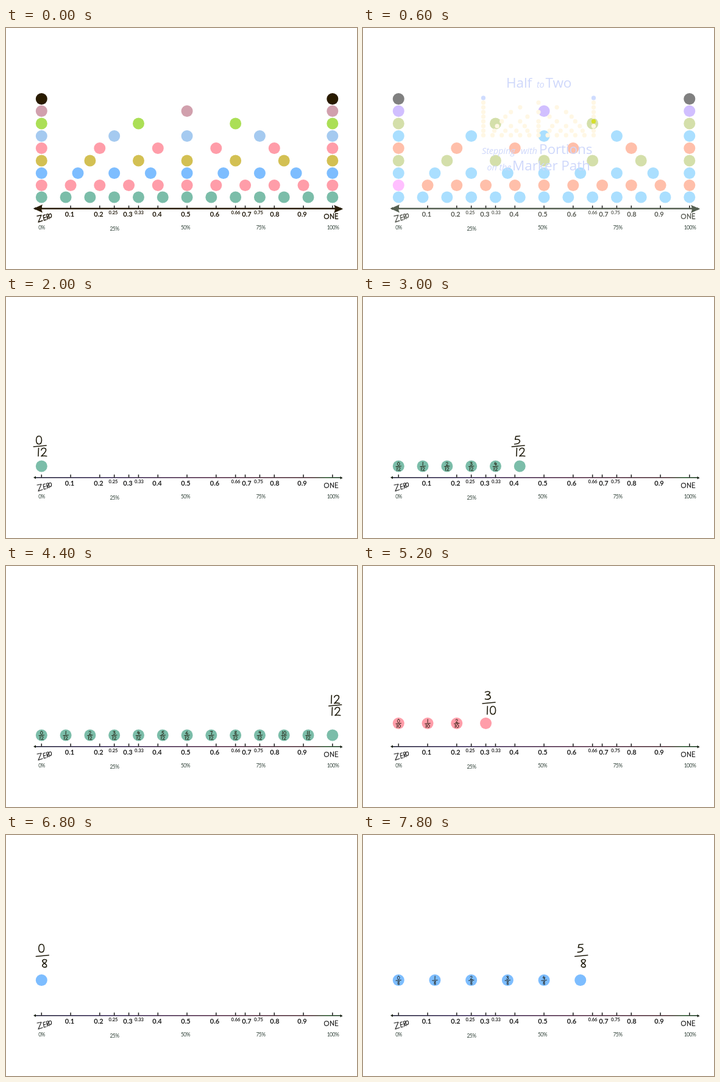
These frames come from a looping animation (576 px wide and 396 px high, 8 s). An HTML page:

```html
<!DOCTYPE html>
<html lang="en">
<head>
<meta charset="utf-8">
<title>Fractions on a line</title>
<style>
  html, body { margin: 0; width: 100%; height: 100%; overflow: hidden; background: #fff; }
  svg { display: block; width: 576px; height: 396px; }
  text { font-family: "Open Sans", "Noto Sans", sans-serif; }
  .title { font-size: 22.5px; letter-spacing: -.1px; }
  .title .it { font-size: 14.5px; font-style: italic; letter-spacing: -.1px; }
  #labels text { text-anchor: middle; font-family: Lato, "Open Sans", sans-serif; }
  #labels .big { font-size: 11px; font-weight: 700; }
  #labels .small { font-size: 7.6px; font-weight: 700; }
  #labels .pct { font-size: 8.5px; letter-spacing: -.5px; fill: #33443b; }
  .pen { fill: none; stroke-linecap: round; stroke-linejoin: round; }
  .hide { display: none; }
</style>
</head>
<body>
<svg id="stage" viewBox="0 0 576 396" xmlns="http://www.w3.org/2000/svg">
  <defs>
    <linearGradient id="ink" gradientUnits="userSpaceOnUse" x1="45" y1="0" x2="552" y2="0">
      <stop offset="0" stop-color="#17172f"/>
      <stop offset=".25" stop-color="#2c1c4c"/>
      <stop offset=".6" stop-color="#4a1f3c"/>
      <stop offset=".9" stop-color="#43222a"/>
      <stop offset=".95" stop-color="#1d4a20"/>
      <stop offset="1" stop-color="#14301a"/>
    </linearGradient>
  </defs>
  <g id="axis">
    <path d="M47 296.7H551" stroke="url(#ink)" stroke-width="1.4"/>
    <path d="M45 296.7L49 294.3V299.1ZM552.5 297.2L548.5 294.8V299.6Z" fill="#1c2418"/>
    <path id="ticks" stroke="#222" stroke-width="1.5"/>
  </g>
  <g id="thick">
    <path d="M54 296.8H544" stroke="currentColor" stroke-width="2.5"/>
    <path d="M45 296.8L60 290Q56.5 297 60 303.6ZM553 297.3L538 290.8Q541.500 297 538 304Z" fill="currentColor"/>
  </g>
  <g id="labels"></g>
  <g id="words" class="pen" stroke="currentColor" stroke-width="1.15">
    <path aria-label="ZERO" d="M51 309L58 307.500L53 319L60 316.500M61 308L62.500 316L66 315M61 308L64.500 307M61.800 312L65 311M66.500 306.500L68 314.500M66.500 306.500Q70 304.500 70 308Q69 310 67 310.500L71 313.500M72.300 305.300C69 306 70 312 72.600 311.800S75.500 305 72.300 305.300"/>
    <path aria-label="ONE" d="M526 305.800C521 306 521.500 313.500 526 313.400S531 305.800 526 305.800M532.500 313.500V305.500L537.500 313V305M540.500 305V313.500H544.800M540.500 305H544.500M540.500 309H544"/>
  </g>
  <g id="full"></g>
  <g id="intro">
    <g id="mini" transform="translate(175.4 70.8) scale(.379)"></g>
    <g class="title">
      <text y="98"><tspan x="235">Half</tspan> <tspan class="it" x="285">to</tspan> <tspan x="299.500">Two</tspan></text>
      <text y="207"><tspan class="it" x="195">Stepping</tspan> <tspan class="it" x="259">with</tspan> <tspan x="289">Portions</tspan></text>
      <text y="234"><tspan class="it" x="203.500">on the</tspan> <tspan x="245">Marker Path</tspan></text>
    </g>
  </g>
  <g id="count"></g>
</svg>
<script>
const $ = id => document.getElementById(id);
const xAt = v => 58.3 + 477.5 * v;

function add(parent, name, attrs, text) {
  const el = document.createElementNS('http://www.w3.org/2000/svg', name);
  for (const key in attrs) el.setAttribute(key, attrs[key]);
  if (text) el.textContent = text;
  return parent.appendChild(el);
}

// Colour helpers: start -> washed -> end over fade steps 0..6
const rgb = hex => [1, 3, 5].map(i => parseInt(hex.slice(i, i + 2), 16));
const mix = (a, b, p) => {
  const to = rgb(b);
  return `rgb(${rgb(a).map((c, i) => Math.round(c + (to[i] - c) * p))})`;
};
const fade = (a, b, c, k) => k <= 2 ? mix(a, b, k / 2) : mix(b, c, (k - 2) / 4);

// Rows of dots: denominator, height, colour, washed colour
const rows = [
  [12, 278, '#7bbda9', '#aadfff'],
  [10, 258.5, '#ff9da9', '#ffbfaa'],
  [8, 238.5, '#7dbdff', '#aadfff'],
  [6, 218, '#d3c053', '#d4dfaa'],
  [5, 197.5, '#ff9da9', '#ffbfaa'],
  [4, 177.5, '#a5caf0', '#aadfff'],
  [3, 157, '#abdf56', '#d4dfaa'],
  [2, 136.5, '#d1a0ad', '#d1bfff'],
  [1, 116.5, '#291b00', '#808080']
];
const dot = (parent, n, d, y, fill) => add(parent, 'circle', { cx: xAt(n / d), cy: y, r: 9.5, fill });

const fullDots = [], miniDots = [];
for (const [d, y, color, wash] of rows) {
  for (let n = 0; n <= d; n++) {
    const fullWash = d === 10 && !n ? '#ffbfff' : wash;
    const miniWash = d === 1 ? '#cfdcff' : d === 6 && n === 6 ? '#d6df2a' : '#fff7e4';
    fullDots.push([dot($('full'), n, d, y, color), color, fullWash, '#ffffff']);
    miniDots.push([dot($('mini'), n, d, y, color), '#ffffff', miniWash, color]);
  }
}

// Axis ticks and labels
const marks = [
  [.1, 104.5], [.2, 152], [.25, 176], [.3, 200], [.33, 218.5], [.4, 248], [.5, 295],
  [.6, 342.5], [.66, 377], [.7, 395], [.75, 414.5], [.8, 441], [.9, 486]
];
const tick = v => `M${xAt(v)} 291.800V297`;
$('ticks').setAttribute('d', [0, 1, ...marks.map(m => m[0])]
  .map(v => tick(v === .33 ? 1 / 3 : v === .66 ? 2 / 3 : v)).join(''));
for (const [v, x] of marks) {
  const small = String(v).length > 3;
  add($('labels'), 'text', { x, y: small ? 305.8 : 310, class: small ? 'small' : 'big' }, String(v));
}
[58.5, 178, 294.5, 418, 536.5].forEach((x, i) =>
  add($('labels'), 'text', { x, y: i === 1 ? 332.5 : 331, class: 'pct' }, i * 25 + '%'));

// Handwritten digits in an 8 x 12 box
const digits = [
  'M4 0C1 0 0 3 0 6S1 12 4 12 8 9 8 6 7 0 4 0',
  'M2 0L1.500 12',
  'M0 3C1 -1 7 -1 7 3C7 6 3 9 0 12Q4 11 8 12',
  'M0 1Q4 -1 7 1Q7 4 2 5Q8 5 8 9Q6 13 0 11',
  'M3 0L0 7H8M6 3L5 12',
  'M8 0L2 .5L1 5Q8 4 8 8Q7 12 0 12',
  'M5 0Q0 4 0 9Q2 13 6 11Q9 7 5 6Q2 6 0 9',
  'M0 1L8 0Q5 6 5 12',
  'M7 1Q3 -1 1 2Q1 4 4 6Q8 8 7 11Q3 13 1 10Q1 7 4 6Q8 3 7 1',
  'M7 3Q4 -1 1 2Q0 6 3 6Q6 6 7 2L6 12'
];

function number(parent, value, x, y) {
  const chars = [...String(value)];
  const wide = c => c === '1' ? 3 : 8;
  const total = chars.reduce((sum, c) => sum + wide(c) + 3, -3);
  let left = x - total / 2;
  for (const c of chars) {
    add(parent, 'path', { d: digits[c], transform: `translate(${left} ${y - 6})` });
    left += wide(c) + 3;
  }
}

function fraction(parent, n, d, x, y, scale, weight, gap, skew) {
  const g = add(parent, 'g', {
    class: 'pen', stroke: '#1f1b0c', 'stroke-width': weight / scale,
    transform: `translate(${x} ${y}) scale(${scale})`, 'aria-label': `${n}/${d}`
  });
  number(g, n, -skew / 2, -gap);
  add(g, 'path', { d: 'M-9.500 .9L9.500 -.9' });
  number(g, d, skew, gap);
  return g;
}

// Where the large label sits relative to its dot
const place = {
  12: n => [-2.6 + Math.max(0, n - 5), -33 - Math.max(0, n - 5) * 16 / 7],
  10: n => [n < 10 ? 5 : -2, n > 7 ? -36 : -33.5],
  8: () => [1.5, -40]
};
const gaps = { 12: 9, 10: 11, 8: 11.3 };

const steps = [];
for (const [d, y, color] of rows.slice(0, 3)) {
  for (let n = 0; n <= d; n++) {
    const g = add($('count'), 'g', {}), x = xAt(n / d), [dx, dy] = place[d](n);
    dot(g, n, d, y, color);
    const small = fraction(g, n, d, x, y + .3, .45, .95, 9.3, 0);
    const large = fraction(g, n, d, x + dx, y + dy, 1.1, 1.6, gaps[d], n < 10 ? 3 : .7);
    steps.push({ d, g, small, large });
  }
}

const show = (el, on) => el.classList.toggle('hide', !on);

function draw(k, s) {
  show($('full'), k < 6);
  show($('thick'), k < 6);
  show($('intro'), k > 0 && s < 0);
  for (const [el, a, b, c] of [...fullDots, ...miniDots]) el.setAttribute('fill', fade(a, b, c, k));
  $('thick').style.color = fade('#291d08', '#566052', '#ffffff', k);
  $('intro').style.fill = fade('#ffffff', '#cfd8fb', '#231f14', k);
  const ink = fade('#20180a', '#5a5c55', '#1f1f1f', k);
  $('labels').style.fill = $('words').style.color = ink;
  $('words').setAttribute('stroke-width', k < 6 ? 1.35 : 1.15);
  steps.forEach((step, i) => {
    show(step.g, s >= i && steps[s].d === step.d);
    show(step.small, i !== s);
    show(step.large, i === s);
  });
}

let last = '';
function frame(now) {
  const t = now % 8000;
  const k = t < 500 ? 0 : Math.min(6, 1 + Math.floor((t - 500) / 100));
  const s = t < 2000 ? -1 : Math.floor((t - 2000) / 200);
  const key = k + ':' + s;
  if (key !== last) draw(k, s);
  last = key;
  requestAnimationFrame(frame);
}
const start = performance.now();
const loop = () => frame(performance.now() - start);
function run() {
  const t = (performance.now() - start) % 8000;
  const k = t < 500 ? 0 : Math.min(6, 1 + Math.floor((t - 500) / 100));
  const s = t < 2000 ? -1 : Math.floor((t - 2000) / 200);
  if (k + ':' + s !== last) draw(k, s);
  last = k + ':' + s;
  requestAnimationFrame(run);
}
run();
</script>
</body>
</html>
```
